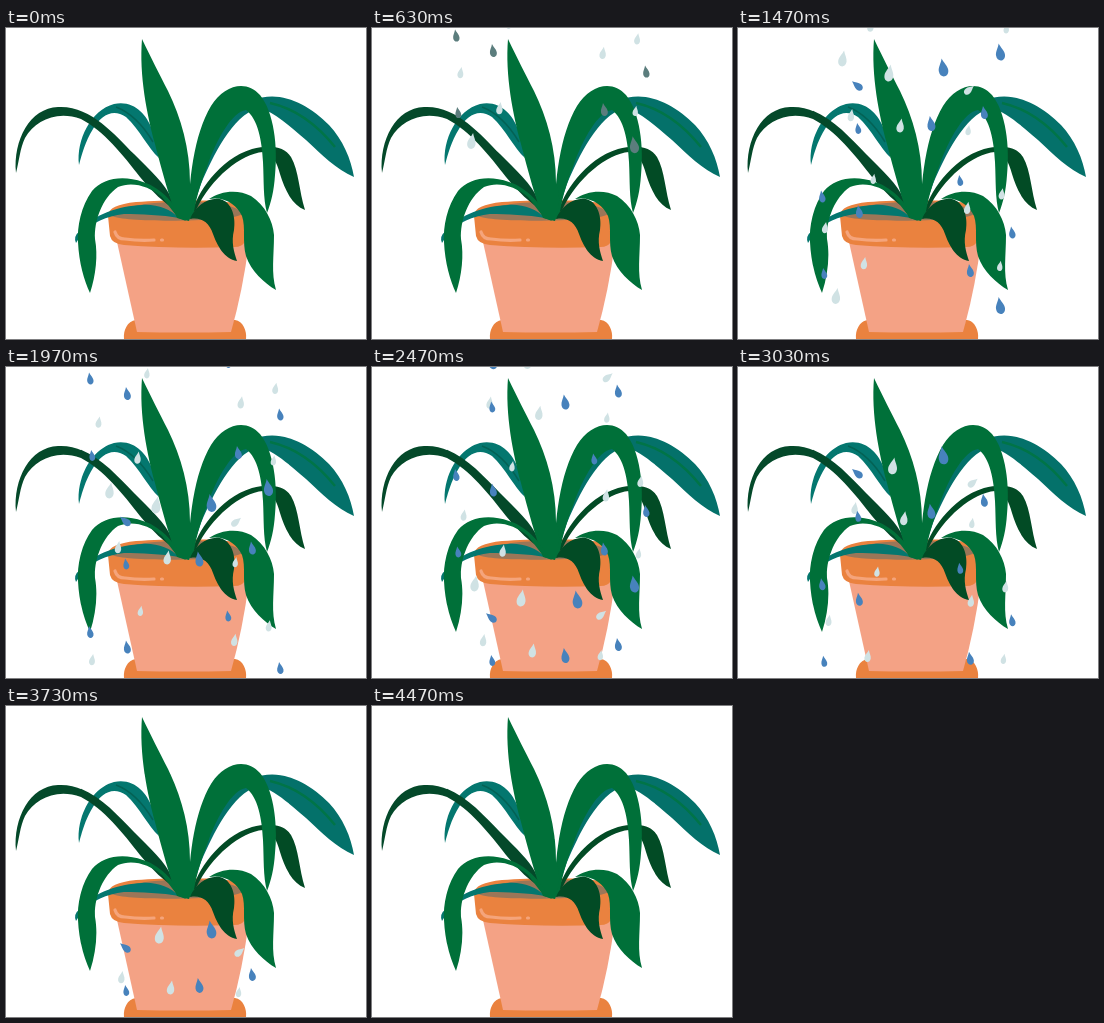
These frames come from a looping animation (360x311 px, 4.51 s). An HTML page:

```html
<!DOCTYPE html>
<html lang="en">
<head>
<meta charset="utf-8">
<title>Watering a plant</title>
<style>
html, body { margin: 0; width: 100%; height: 100%; overflow: hidden; background: #fff; }
svg { display: block; width: 100vw; height: 100vh; }
</style>
</head>
<body>
<svg viewBox="0 0 360 311" preserveAspectRatio="none">
  <defs>
    <path id="drop" d="M0-.5C.14-.25 .5-.05 .5 .18C.5 .62-.5 .62-.5 .18C-.5-.05-.14-.25 0-.5Z"/>
    <g id="shower"></g>
  </defs>
  <!-- saucer and pot -->
  <path fill="#ea823f" d="M118 311C117 303 121 293 130 292H229C237 293 241 303 240 311Z"/>
  <path fill="#f4a285" d="M111 214L131 304Q178 305 225 304Q237 262 243 214Z"/>
  <path fill="#ea823f" d="M102 188C102 180 112 176 130 174C160 172 205 171 228 175C238 177 242 184 241 192L239 213Q237 219 228 219Q170 221 118 217Q106 216 104 208Z"/>
  <path fill="#9b7658" d="M106 188C114 178 145 174 172 174C204 173 233 177 236 186C229 194 118 195 106 188Z"/>
  <path fill="none" stroke="#f5a47b" stroke-width="3.2" stroke-linecap="round" d="M109 204Q111 211 119 211Q134 213 148 212M155.5 212H156.5"/>
  <!-- back leaves -->
  <path fill="#04776f" d="M73 137C70 112 85 82 108 76C128 72 140 86 146 101C150 110 151 120 153 130C142 120 134 102 120 89C107 80 95 87 87 101C79 114 76 126 73 137Z"/>
  <path fill="none" stroke="#036255" stroke-width="1.5" d="M110 79Q131 87 147 114"/>
  <path fill="#04716a" d="M184 188C187 148 207 93 246 73C272 61 301 75 323 97C337 112 345 131 348 149C330 141 316 127 300 112C284 99 270 84 252 80C226 88 207 128 195 156Z"/>
  <path fill="none" stroke="#007447" stroke-width="2.4" d="M264 75Q300 83 329 119"/>
  <path fill="#024b25" d="M186 186C190 166 213 131 246 121C263 117 278 118 285 129C293 143 293 163 299 182C286 177 279 162 274 146C271 134 266 125 257 124C235 126 206 149 190 182Z"/>
  <path fill="#04492a" d="M10 145C7 112 24 80 52 79C84 77 108 106 128 126C145 143 160 157 165 170L172 183C158 176 146 163 134 149C117 127 98 103 75 91C50 82 29 93 19 110C14 120 13 134 10 145Z"/>
  <path fill="#04776f" d="M173 190C156 187 135 186 118 186C100 188 86 195 77 204L70 215Q67 208 74 203C88 186 113 178 136 177C151 176 164 181 173 190Z"/>
  <!-- front leaves -->
  <path fill="#007039" d="M183 191C182 155 188 106 205 78C218 57 240 51 254 67C268 84 272 119 269 147C268 163 265 175 261 185C257 170 258 153 257 134C256 113 252 91 240 82C226 84 211 111 202 136C194 156 189 174 187 190Z"/>
  <path fill="#007039" d="M136 11C145 30 153 45 162 63C175 90 184 120 184 155C190 170 186 184 183 193L171 190C164 172 156 143 149 116C141 87 133 47 136 11Z"/>
  <path fill="#007039" d="M180 193C170 179 157 160 137 154C117 147 97 150 86 163C75 178 71 199 72 214C73 235 78 252 84 265C90 247 92 227 89 211C88 193 96 170 112 159C126 153 143 158 156 169L172 190Z"/>
  <path fill="#007039" d="M203 171C214 163 232 161 245 168C259 177 267 193 268 207C268 228 265 245 270 262C258 255 245 243 240 228C236 214 240 200 236 188C231 177 219 168 203 171Z"/>
  <path fill="#024b25" d="M184 191C189 178 202 169 214 171C226 174 230 189 228 202C225 214 228 224 231 233C218 231 211 217 207 206C203 194 195 189 184 191Z"/>
  <!-- two showers of each colour; the pale ones are mirrored -->
  <g id="pale" fill="#d0e2e4">
    <use href="#shower"/><use href="#shower" x="-7" y="-253.5"/>
  </g>
  <g id="blue">
    <use href="#shower"/><use href="#shower" y="-253.5"/>
  </g>
</svg>
<script>
const LOOP = 4510, STEP = 1000 / 30;
const $ = id => document.getElementById(id);

// x, y, height and, for one plump drop, its lean
const drops = [
  [205, 40, 18], [119, 58, 13, -50], [193, 96, 15], [246, 85, 13],
  [120, 101, 11], [222, 153, 11], [84, 169, 12], [121, 184, 13],
  [274, 205, 12], [232, 243, 13], [86, 246, 11], [262, 278, 17]
];
$("shower").innerHTML = drops.map(([x, y, h, lean = -9]) =>
  `<use href="#drop" transform="translate(${x} ${y}) rotate(${lean}) scale(${h * .53} ${h})"/>`
).join("");

function draw(time) {
  const t = Math.floor((time + 4) / STEP) * STEP;
  const dt = t - 1470;
  const k = Math.min(1, Math.max(0, (t - 600) / 800));
  const mix = (a, b) => Math.round(a + (b - a) * k);

  $("blue").setAttribute("fill", `rgb(${mix(92, 71)},${mix(125, 130)},${mix(122, 188)})`);
  $("blue").setAttribute("transform", `translate(0 ${.193 * dt})`);
  $("pale").setAttribute("transform",
    `translate(${342 - .0018 * dt} ${8 + .186 * dt}) scale(-.93 .937)`);
  $("pale").setAttribute("visibility", t > 0 ? "visible" : "hidden");
  $("blue").setAttribute("visibility", t > 0 ? "visible" : "hidden");
}

const start = performance.now();
function tick() {
  draw((performance.now() - start) % LOOP);
  requestAnimationFrame(tick);
}
tick();
</script>
</body>
</html>
```
